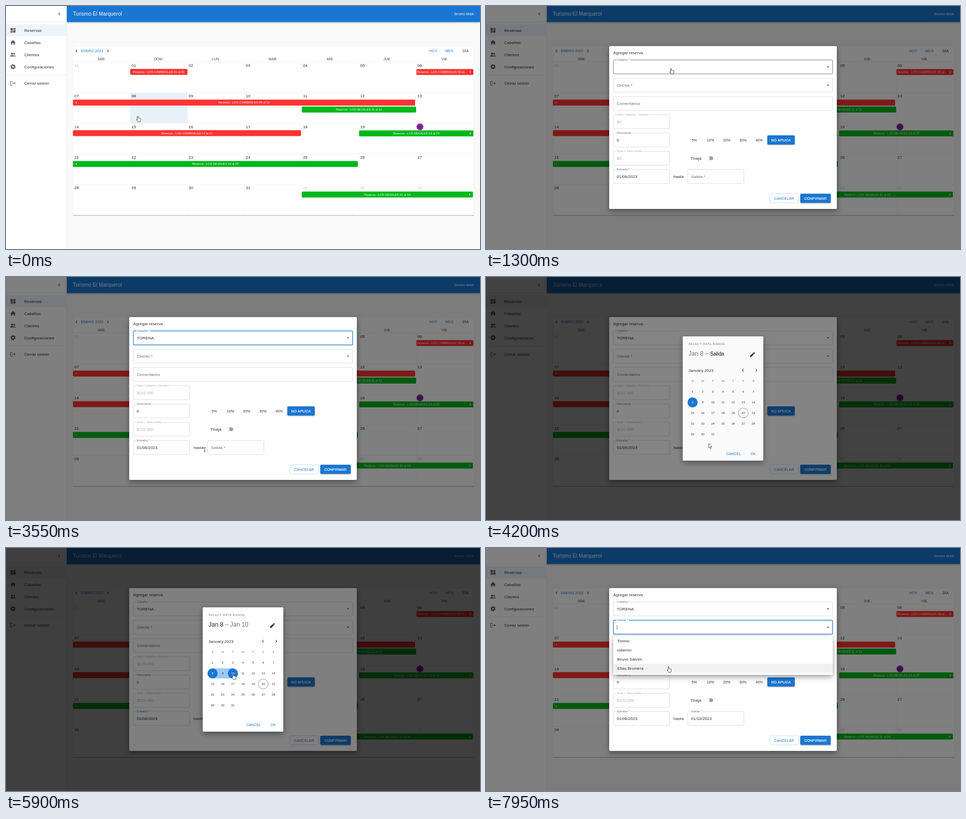
An HTML page for the animation above (8000 ms loop, 935 px wide and 479 px high).

```html
<!DOCTYPE html>
<html lang="es">
<head>
<meta charset="utf-8">
<title>Reservas</title>
<style>
html, body { margin: 0; width: 100%; height: 100%; overflow: hidden; background: #fafafa; }
svg { display: block; width: 100%; height: 100%; font-family: "Liberation Sans", Arial, sans-serif; }
text { white-space: pre; }
.btn { letter-spacing: .02857em; }
.body { letter-spacing: .00938em; }
.notch { paint-order: stroke; stroke: #fff; stroke-width: 3px; }
.paper { filter: drop-shadow(0 4px 6px rgba(0,0,0,.4)); }
</style>
</head>
<body>
<svg viewBox="0 0 935 479">
  <g id="page"></g>
  <rect id="dim1" width="935" height="479" opacity="0"/>
  <g id="dialog"></g>
  <g id="menu"></g>
  <rect id="dim2" width="935" height="479" opacity="0"/>
  <g id="picker"></g>
  <g id="cursor"></g>
</svg>
<script>
const LOOP = 8000, STEP = 50;
const BLUE = '#1976d2', INK = '#2b2b2b', GREY = '#707070', PALE = '#b0b0b0';
const RED = '#ff3333', GREEN = '#00b81c';
const CABINS = ['LOS CAMBRALES', 'LOS NEVALES', 'TORENA'];
const CLIENTS = ['Tonino', 'robertín', 'Bruno Salvén', 'Elías Bromera'];
const el = id => document.getElementById(id);

// y is the vertical middle of the capitals
const text = (x, y, size, str, fill = INK, more = '') =>
  `<text x="${x}" y="${y + size * .36}" font-size="${size}" fill="${fill}" ${more}>${str}</text>`;
const MID = 'text-anchor="middle"';
const body = (x, y, str, fill, more = '') => text(x, y, 8, str, fill, 'class="body" ' + more);
const btn = (x, y, str, fill, more = '') => text(x, y, 7, str, fill, `class="btn" ${MID} ${more}`);
const rect = (x, y, w, h, fill, more = '') =>
  `<rect x="${x}" y="${y}" width="${w}" height="${h}" fill="${fill}" ${more}/>`;
const path = (d, fill, more = '') => `<path d="${d}" fill="${fill}" ${more}/>`;
const circle = (x, y, r, fill, more = '') => `<circle cx="${x}" cy="${y}" r="${r}" fill="${fill}" ${more}/>`;
const chevron = (x, y, dir, color = '#555') =>
  path(`M${x - dir * 1.3} ${y - 2.6}l${dir * 2.6} 2.6l${-dir * 2.6} 2.6`, 'none', `stroke="${color}" stroke-width="1.1"`);

/* ---------- page ---------- */
const colX = i => 132 + i * 112.8;
const rowY = i => 110.5 + i * 60.3;

function icons() {
  const c = '#5f5f5f';
  return rect(9, 43.5, 4.3, 5, c) + rect(9, 49.5, 4.3, 3, c) + rect(14.3, 43.5, 4.3, 3, c) + rect(14.3, 47.5, 4.3, 5, c) +
    path('M8.5 72l5.3-5l5.3 5h-1.5v4h-2.7v-3h-2.3v3h-2.6v-4z', c) +
    circle(11.8, 94, 2, c) + circle(16, 94, 1.8, c) +
    path('M8 99.5q0-2.8 3.8-2.8t3.8 2.8zM16.2 99.5q0-1.6-1-2.6q4 0 4 2.6z', c) +
    circle(13.8, 119.7, 3, 'none', `stroke="${c}" stroke-width="2.4"`) +
    circle(13.8, 119.7, 4.5, 'none', `stroke="${c}" stroke-width="1.2" stroke-dasharray="2.3 2.4"`) +
    path('M13 148.5h-3.8v7.5h3.8M12 152.2h6.5m-2.3-2.3l2.3 2.3l-2.3 2.3', 'none', `stroke="${c}"`);
}

function bar(x, y, w, color, cabin, span, prev, next) {
  const str = `Reserva - LOS ${cabin} ${span}`;
  return rect(x, y, w, 11.8, color, 'rx="2"') +
    text(x + w / 2 + (next && w < 115 ? -6 : 0), y + 5.6, 6, str, '#fff', MID) +
    (prev ? path(`M${x + 7.2} ${y + 4}v4l-2-2z`, '#fff') : '') +
    (next ? path(`M${x + w - 7} ${y + 4}v4l2-2z`, '#fff') : '');
}

function page(hover) {
  let s = rect(0, 0, 935, 479, '#fafafa') + rect(0, 0, 120, 479, '#fff') +
    rect(119.5, 31, .6, 448, '#e2e2e2') + rect(0, 31, 120, .6, '#e2e2e2') + rect(0, 135.7, 120, .6, '#e2e2e2') +
    rect(0, 36, 120, 23.6, '#edf4fc') + chevron(105, 15.5, -1) + icons();
  ['Reservas', 'Cabañas', 'Clientes', 'Configuraciones'].forEach((n, i) => s += body(36, 47.7 + i * 24, n));
  s += body(36, 152, 'Cerrar sesión');
  s += rect(120, 0, 815, 31.5, BLUE, 'style="filter:drop-shadow(0 1px 1.5px rgba(0,0,0,.35))"') +
    text(132, 15.5, 10, 'Turismo El Marquerol', '#fff', 'letter-spacing=".075"') +
    body(923, 15.5, 'bruno-tesk', '#fff', 'text-anchor="end"');
  s += rect(132, 79, 791, 334, '#fff', 'stroke="#ececec" stroke-width=".6"') + rect(132, 412.3, 791, .9, '#a0a0a0');
  s += chevron(139, 88.5, -1) + chevron(201, 88.5, 1) + btn(170, 88.5, 'ENERO 2023', BLUE) +
    btn(843, 88.5, 'HOY', BLUE) + btn(874.7, 88.5, 'MES', BLUE) + btn(906.6, 88.5, 'DÍA', INK);
  if (hover) s += rect(colX(1), rowY(1), 113.5, 60.3, '#e8f0fa');
  ['SÁB.', 'DOM.', 'LUN.', 'MAR.', 'MIÉ.', 'JUE.', 'VIE.'].forEach((d, i) =>
    s += text(colX(i) + 56.4, 104.3, 7, d, '#444', MID));
  for (let i = 0; i < 5; i++) s += rect(132, rowY(i), 791, .5, '#e6e6e6');
  for (let i = 1; i < 7; i++) s += rect(colX(i), 110.5, .5, 302, '#efefef');
  s += circle(816.6, 238.2, 6.7, '#8e24aa');
  for (let n = 0; n < 35; n++) {
    const out = n < 1 || n > 31, day = n < 1 ? 31 : n > 31 ? n - 31 : n;
    s += text(colX(n % 7) + 2.7, rowY(Math.floor(n / 7)) + 6.7, 8, String(day).padStart(2, '0'), out ? '#c4c4c4' : INK);
  }
  const a = 'CAMBRALES', b = 'NEVALES';
  return s + bar(245, 124, 113, RED, a, '01 al 01') + bar(809.5, 124.3, 112.5, RED, a, '06 al...', 0, 1) +
    bar(132, 184.5, 675, RED, a, '06 al 12', 1) + bar(583.5, 198.2, 225.5, GREEN, b, '11 al 12') +
    bar(132, 244.8, 450, RED, a, '14 al 17') + bar(696.5, 245.2, 225.5, GREEN, b, '19 al 25', 0, 1) +
    bar(132, 305.5, 562, GREEN, b, '19 al 25', 1) + bar(583.5, 365.8, 337.5, GREEN, b, '01 al 04', 0, 1);
}

/* ---------- booking dialog ---------- */
function field(x, y, w, label, o) {
  const c = o.focus || o.tint ? BLUE : o.dim ? PALE : GREY;
  const line = o.focus ? BLUE : o.hover ? '#222' : '#c4c4c4';
  const up = o.val || o.focus || o.up;
  const ax = x + w - 12, d = o.flip ? -1 : 1;
  return rect(x + .3, y + .3, w - .6, 27.6, 'none', `rx="2" stroke="${line}" stroke-width="${o.focus ? 1.2 : .6}"`) +
    (up ? text(x + 7, y, 6, label, c, 'class="notch"') : body(x + 7, y + 14, label, c)) +
    (o.val ? body(x + 7, y + 14, o.val, o.dim ? PALE : INK) : '') +
    (o.arrow ? path(`M${ax} ${y + 14 - d * 1}h5l-2.5 ${d * 2.5}z`, '#555') : '');
}

function button(x, y, w, str, filled) {
  return rect(x, y, w, 18, filled ? BLUE : '#fff', filled
    ? 'rx="2" style="filter:drop-shadow(0 1px 1px rgba(0,0,0,.4))"'
    : 'rx="2" stroke="#a3c6ea" stroke-width=".6"') +
    btn(x + w / 2, y + 9, str, filled ? '#fff' : BLUE, filled ? 'stroke="#fff" stroke-width=".2"' : '');
}

function dialog(s) {
  const hit = (x, y, w) => s.free && s.x > x && s.x < x + w && s.y > y && s.y < y + 28;
  const f = (x, y, w, label, o = {}) => field(x, y, w, label, { hover: !o.dim && hit(x, y, w), ...o });
  let out = `<g class="paper">${rect(243, 79, 449, 321, '#fff', 'rx="2"')}</g>` + body(251, 92, 'Agregar reserva') +
    f(251, 106, 433, 'Cabaña *', { val: s.cabin, up: 1, focus: s.focus == 'cabin', arrow: 1 }) +
    f(251, 142, 433, 'Cliente *', { focus: s.focus == 'client', arrow: 1, flip: s.focus == 'client' }) +
    f(251, 178, 433, 'Comentarios') +
    f(251, 214, 111.5, 'Valor Cabaña + Noches', { val: s.price, dim: 1 }) +
    f(251, 250, 111.5, 'Descuento', { val: '0' }) +
    f(251, 286, 111.5, 'Total + Descuento', { val: s.price, dim: 1 }) +
    f(251, 322, 111.5, 'Entrada *', { val: '01/08/2023', tint: s.focus == 'in' }) +
    f(397.5, 322, 111.5, 'Salida *', { val: s.exit, focus: s.focus == 'out' });
  [5, 10, 20, 30, 40].forEach((p, i) => out += btn(411 + i * 32, 264.3, p + '%', INK));
  return out + button(555, 255, 54, 'NO APLICA', 1) + body(403, 300, 'Tinaja') +
    rect(434, 296.5, 14, 7, '#9a9a9a', 'rx="3.5"') +
    circle(436, 300, 5, '#fff', 'style="filter:drop-shadow(0 .5px .5px rgba(0,0,0,.25))"') +
    body(370, 336, 'hasta') + button(560, 370, 56, 'CANCELAR') + button(620, 370, 60, 'CONFIRMAR', 1);
}

function list(y, items, active, pad = 0) {
  let out = `<g class="paper">${rect(251, y, 433, items.length * 18 + 4 + pad, '#fff', 'rx="2"')}</g>`;
  items.forEach((name, i) => {
    const top = y + pad + i * 18;
    if (i == active) out += rect(251, top, 433, 18, '#f1f1f1');
    out += body(259, top + 9, name);
  });
  return out;
}

/* ---------- date range picker ---------- */
function picker(s) {
  const end = s.exit ? 10 : 0;
  let out = `<g class="paper">${rect(388, 117, 159, 245, '#fff', 'rx="2"')}</g>` +
    text(399.5, 132, 6, 'SELECT DATE RANGE', GREY, 'letter-spacing=".5"') +
    text(399.5, 151, 12, 'Jan 8 ', end ? INK : GREY) + text(432, 151, 12, '–', GREY) +
    (end ? text(442, 151, 12, 'Jan 10', GREY) : text(442, 151, 10, 'Salida', INK, 'stroke="#2b2b2b" stroke-width=".15"')) +
    path('M521 157.5v-2.2l5.4-5.4l2.2 2.2l-5.4 5.4zM527 149.3l1-1q.6-.5 1.1 0l1.1 1.1q.5.5 0 1.1l-1 1z', '#222') +
    body(399.5, 184, 'January 2023') + chevron(507, 184, -1) + chevron(533, 184, 1);
  [...'SMTWTFS'].forEach((d, i) => out += text(407.5 + i * 20, 205, 6, d, GREY, MID));
  if (end) out += rect(407.5, 237.2, 40, 20, '#9ccaf4');
  for (let d = 1; d <= 31; d++) {
    const x = 407.5 + (d - 1) % 7 * 20, y = 226 + Math.floor((d - 1) / 7) * 20.9;
    const on = d == 8 || d == end;
    const over = s.hand && Math.abs(s.x - x) < 9 && Math.abs(s.y - 6 - y) < 9;
    if (on) out += circle(x, y + .3, 10, BLUE);
    else if (over) out += circle(x, y + .3, 9.7, '#f3f3f3', 'stroke="#aaa" stroke-width=".6"');
    else if (d == 20) out += circle(x, y + .3, 9.7, 'none', 'stroke="#666" stroke-width=".7"');
    out += text(x, y, 6, d, on ? '#fff' : INK, MID);
  }
  if (s.overOk) out += circle(526, 348, 10, '#bcd9f5');
  return out + btn(488.5, 348.5, 'CANCEL', BLUE) + btn(527, 348.5, 'OK', BLUE);
}

/* ---------- timeline ---------- */
const clamp = v => Math.max(0, Math.min(1, v));
const smooth = p => p * p * (3 - 2 * p);
const fade = (t, from, to) => Math.min(smooth(clamp((t - from) / 225)), 1 - smooth(clamp((t - to) / 195)));

// time, x, y
const TRACK = [
  [0, 261, 222], [400, 261, 221], [800, 262, 220], [1250, 366, 128], [1600, 366, 128], [2000, 345, 150],
  [2450, 300, 190], [2800, 300, 190], [3550, 392, 340], [3800, 440, 337], [4100, 440, 337], [4850, 470, 256],
  [5100, 470, 256], [5500, 449, 253], [5900, 449, 253], [6550, 526, 349], [6850, 526, 349],
  [7350, 390, 158], [7500, 388, 158], [7900, 361, 239], [8000, 361, 239]
];
function pointer(t) {
  const i = TRACK.findIndex(k => k[0] > t), [t0, x0, y0] = TRACK[i - 1], [t1, x1, y1] = TRACK[i];
  const p = smooth((t - t0) / (t1 - t0));
  return [x0 + (x1 - x0) * p, y0 + (y1 - y0) * p];
}
// until, shape
const SHAPES = [[400, 'hand'], [1150, 'arrow'], [2800, 'hand'], [3450, 'arrow'], [4050, 'beam'],
  [4500, 'arrow'], [6950, 'hand'], [7250, 'arrow'], [7550, 'beam'], [8001, 'hand']];
const CURSORS = {
  hand: path('M-2-4.5q1-1.3 1.9 0v3.4q1.2-.8 1.7.3q1.2-.5 1.6.5q1.4-.4 1.4 1v2.3q0 1.8-1.4 3.2h-4q-1.3-2-3-4.2q.3-1.2 1.8.2z',
    '#fff', 'stroke="#222" stroke-width=".8" stroke-linejoin="round"'),
  arrow: path('M-2-5v8.8l2-1.8l1.4 3.2l1.4-.6l-1.4-3.2h2.7z', '#fff', 'stroke="#222" stroke-width=".7"'),
  beam: path('M-1.8-4h1.4l.4.4l.4-.4h1.4M0-3.6v7.2M-1.8 4h1.4l.4-.4l.4.4h1.4', 'none', 'stroke="#222" stroke-width=".9"')
};

const cache = {};
function put(id, html) {
  if (cache[id] !== html) el(id).innerHTML = cache[id] = html;
}

function draw(t) {
  const [x, y] = pointer(t), shape = SHAPES.find(k => t < k[0])[1];
  const picked = t >= 2650, ranged = t >= 5750;
  const open = fade(t, 400, LOOP), dates = fade(t, 4000, 6765);
  const cabins = fade(t, 1550, 2650), clients = t >= 7450;
  const focus = t < 1550 ? '' : t < 3900 ? 'cabin' : t < 5750 ? 'out' : t < 6950 ? 'in' : clients ? 'client' : '';
  const s = {
    x, y, focus, hand: shape == 'hand', overOk: t >= 6450 && t < 6950,
    free: open == 1 && t > 1100 && !dates && !cabins && !clients,
    cabin: picked ? CABINS[2] : '', exit: ranged ? '01/10/2023' : '',
    price: ranged ? '$220.000' : picked ? '$110.000' : '$0'
  };
  put('page', page(t < 400));
  put('dialog', open ? dialog(s) : '');
  put('picker', dates ? picker(s) : '');
  const caret = clients && (t - 7450) % 1000 < 550 ? rect(258, 152, .7, 9, INK) : '';
  put('menu', cabins ? list(134, CABINS, Math.max(0, Math.floor((y - 138) / 18)), 4)
    : clients ? list(174, CLIENTS, Math.floor((y - 174) / 18)) + caret : '');
  put('cursor', CURSORS[shape]);
  const alpha = (id, v) => el(id).setAttribute('opacity', v.toFixed(3));
  alpha('dim1', open * .5);
  alpha('dialog', open);
  alpha('menu', clients ? 1 : cabins);
  alpha('dim2', dates * .5);
  alpha('picker', dates);
  el('cursor').setAttribute('transform', `translate(${x.toFixed(2)} ${y.toFixed(2)})`);
}

const start = performance.now();
function tick() {
  const t = (performance.now() - start) % LOOP;
  draw(Math.floor(t / STEP) * STEP);
  requestAnimationFrame(tick);
}
tick();
</script>
</body>
</html>
```
